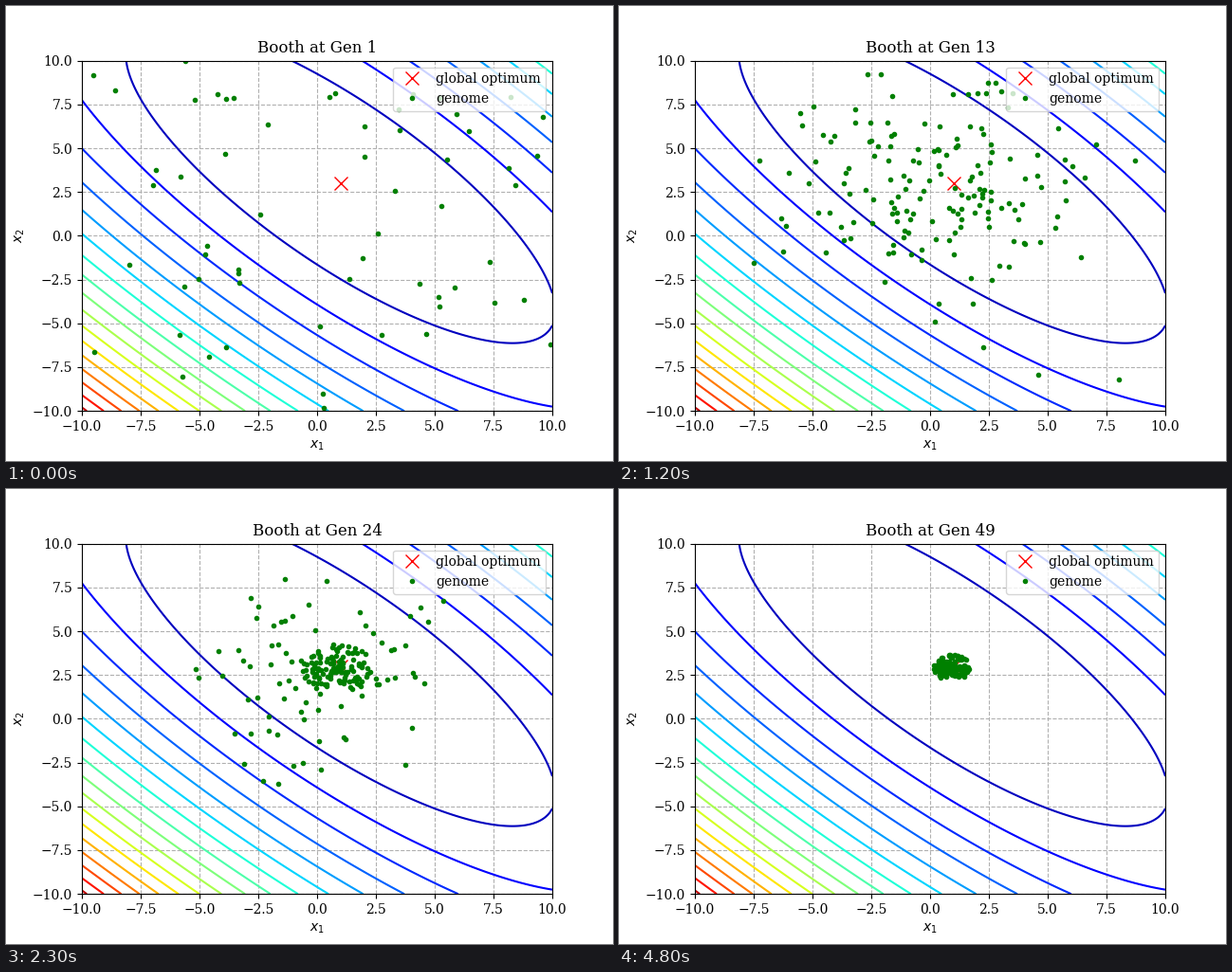
Write a matplotlib script that moves like this. It is 640 px wide and 480 px high and loops after 4.9 s.

```python
import numpy as np
import matplotlib.pyplot as plt
from matplotlib.animation import FuncAnimation

plt.rcParams["font.family"] = "DejaVu Serif"

GENS = 49
LIMIT = 10
OPTIMUM = 1, 3
SWARM_SIZE = 140
SWARM_RADIUS = 1.5


def booth(x, y):
    return (x + 2 * y - 7) ** 2 + (2 * x + y - 5) ** 2


def make_swarm():
    """Offsets inside a disc that gets denser towards its middle."""
    rng = np.random.default_rng(7)
    angle = rng.uniform(0, 2 * np.pi, SWARM_SIZE)
    radius = SWARM_RADIUS * rng.random(SWARM_SIZE) ** 0.8
    return np.column_stack([radius * np.cos(angle), radius * np.sin(angle)])


SWARM = make_swarm()


def explorers(gen):
    """Wide scatter: nearly uniform at first, then normal and shrinking."""
    count = round(np.interp(gen, (1, 9, 16, 24, 32), (60, 105, 180, 85, 0)))
    spread = np.interp(gen, (1, 9, 16, 24, 32), (15, 5, 2.1, 2.9, 1))
    rng = np.random.default_rng(100 + gen)
    points = rng.normal((0.4, 2.6), spread, (800, 2))
    inside = np.abs(points).max(axis=1) <= LIMIT
    return points[inside][:count]


def converged(gen):
    """A fixed swarm around the optimum that grows in number and contracts."""
    count = round(np.interp(gen, (1, 16, 24, 32), (0, 20, 115, SWARM_SIZE)))
    scale = np.interp(gen, (9, 24, 32, 39, 49), (2, 1, 1, 1.1, 0.53))
    center = np.subtract(OPTIMUM, 0.15 * scale)
    return center + scale * SWARM[:count]


def population(gen):
    return np.vstack([converged(gen), explorers(gen)])


fig, ax = plt.subplots(figsize=(6.4, 4.8), dpi=100)
axis = np.linspace(-LIMIT, LIMIT, 200)
X, Y = np.meshgrid(axis, axis)
ax.contour(X, Y, booth(X, Y), 20, cmap="jet")
ax.plot(*OPTIMUM, "rx", markersize=10, label="global optimum")
genomes, = ax.plot([], [], "g.", label="genome")
ax.set(xlim=(-LIMIT, LIMIT), ylim=(-LIMIT, LIMIT), xlabel="$x_1$", ylabel="$x_2$")
ax.grid(linestyle="--")
ax.legend(loc="upper right")
title = ax.set_title("Booth at Gen 1")


def update(i):
    gen = i + 1
    genomes.set_data(*population(gen).T)
    title.set_text(f"Booth at Gen {gen}")
    return genomes, title


anim = FuncAnimation(fig, update, frames=GENS, interval=100, repeat=True, repeat_delay=0)
plt.show()
```
